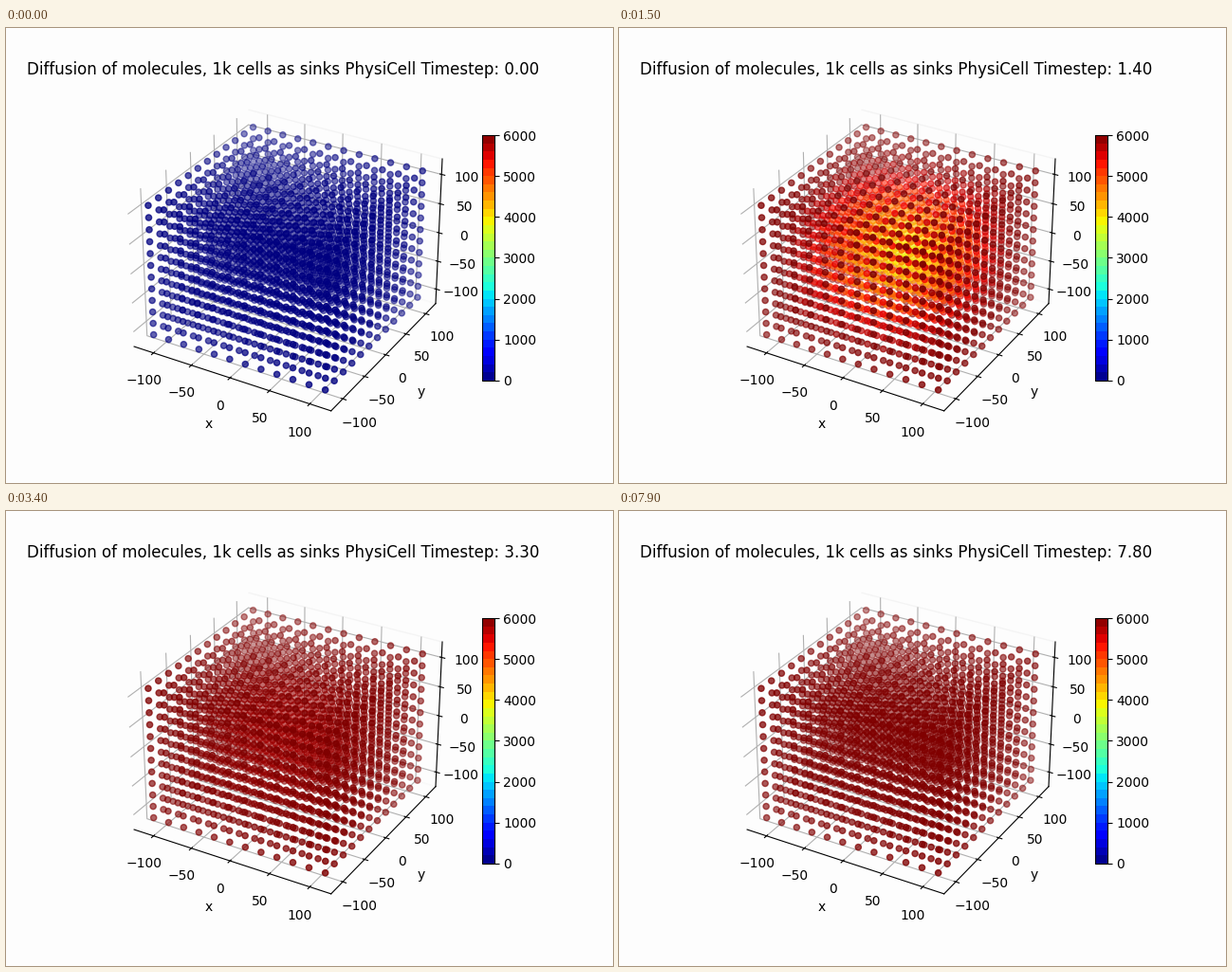
These frames come from a looping animation (640x480 px, 8000 ms). A matplotlib script:

```python
import numpy as np
import matplotlib.pyplot as plt
from matplotlib.animation import FuncAnimation
from matplotlib.cm import ScalarMappable
from matplotlib.colors import Normalize

BG = "#fdfdfd"
N = 12            # voxels per side
PEAK = 6000       # concentration held on the outer walls
DECAY = 1.2       # rate of the slowest mode of the cube
FRAMES = 80
LIMIT = 121 * 25 / 24

plt.rcParams.update({"font.family": "DejaVu Sans",
                     "figure.facecolor": BG, "axes.facecolor": BG})

# Sine modes of 1D diffusion between two fixed walls
modes = np.arange(1, N - 1)
basis = np.sin(np.pi * np.outer(modes, np.arange(N)) / (N - 1))
weights = 2 / (N - 1) * basis.sum(axis=1)
rates = (DECAY / 3 * (np.sin(np.pi * modes / (2 * N - 2))
                      / np.sin(np.pi / (2 * N - 2))) ** 2)


def concentration(t):
    if t <= 0:
        return np.zeros(N ** 3)
    gap = (weights * np.exp(-rates * t)) @ basis
    gap[[0, -1]] = 0
    cube = gap[:, None, None] * gap[None, :, None] * gap[None, None, :]
    return PEAK * (1 - cube).ravel()


fig = plt.figure(figsize=(6.4, 4.8), dpi=100)
ax = fig.add_subplot(projection="3d")

centers = np.linspace(-110, 110, N)
x, y, z = (g.ravel() for g in np.meshgrid(centers, centers, centers, indexing="ij"))
norm = Normalize(0, PEAK)
dots = ax.scatter(x, y, z, c=concentration(0), cmap="jet", norm=norm)

ax.set(xlim=(-LIMIT, LIMIT), ylim=(-LIMIT, LIMIT), zlim=(-LIMIT, LIMIT),
       xlabel="x", ylabel="y")
for axis, edge in ((ax.xaxis, BG), (ax.yaxis, "#ececec"), (ax.zaxis, BG)):
    axis.pane.set_facecolor(BG)
    axis.pane.set_edgecolor(edge)

fig.colorbar(ScalarMappable(norm, "jet"), ax=ax, shrink=0.7,
             boundaries=np.linspace(0, PEAK, 31),
             ticks=np.arange(0, PEAK + 1, 1000))
title = ax.set_title("")


def update(i):
    t = max(0, i - 1) / 10
    dots.set_array(concentration(t))
    title.set_text(f"Diffusion of molecules, 1k cells as sinks PhysiCell Timestep: {t:.2f}")
    return dots, title


anim = FuncAnimation(fig, update, frames=FRAMES, interval=100,
                     repeat=True, repeat_delay=0, blit=False)
plt.show()
```
